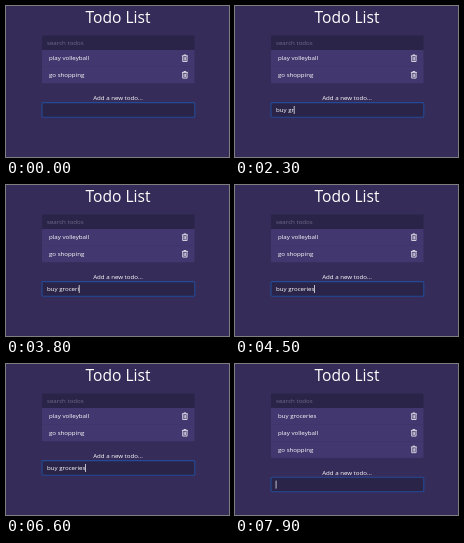
These frames come from a looping animation (223 px wide and 151 px high, 8 s). An HTML page:

```html
<!DOCTYPE html>
<html lang="en">
<head>
<meta charset="utf-8">
<title>Todo List</title>
<style>
  html, body { margin: 0; width: 100%; height: 100%; overflow: hidden; background: #352c59; }
  svg { display: block; width: 223px; height: 151px; }
  text { font: 6.15px "Open Sans", "Noto Sans", sans-serif; fill: #fff; white-space: pre; }
  .title { font-size: 15.6px; font-weight: 500; }
  .mid { text-anchor: middle; }
  .hint { fill: #706a8b; }
  .field { fill: #2a2448; }
  .row { fill: #42376e; }
  .bin { fill: none; stroke: #fff; stroke-width: .75; }
</style>
</head>
<body>
<svg viewBox="0 0 223 151">
  <defs>
    <path id="bin" class="bin" d="M0 1.3H6M2 1.2V.4H4V1.2M.8 1.5V7H5.2V1.5M2.3 2.6V6M3.7 2.6V6"/>
  </defs>
  <text class="title mid" x="112" y="16.8">Todo List</text>
  <rect class="field" x="36" y="29.5" width="152.5" height="14.5"/>
  <text class="hint" x="41" y="39.2">search todos</text>
  <g id="list"></g>
  <g id="form">
    <text class="mid" x="112" y="94.2">Add a new todo...</text>
    <rect class="field" x="36" y="96.6" width="152.8" height="14.6" rx="1.2" stroke="#244a96" stroke-width="1.1"/>
    <text id="typed" x="41" y="106.3"></text>
    <rect id="caret" y="100" width=".7" height="8" fill="#fff"/>
  </g>
</svg>
<script>
const LOOP = 8000, SUBMIT = 6700, BLINK = 530, ROW = 16.6;
const entry = "buy groceries";
const keyTimes = [700, 900, 1200, 1400, 1700, 1900, 2400, 2600, 2800, 3100, 3700, 4000, 4300];
const [list, form, typed, caret] = ["list", "form", "typed", "caret"].map(id => document.getElementById(id));

const row = (label, i) => `<g transform="translate(0 ${44 + i * ROW})">
  <rect class="row" x="36" width="152.5" height="${ROW + .1}"/>
  <text x="43" y="10.4">${label}</text>
  <use href="#bin" x="175.9" y="4.5"/></g>`;

let shown;
function showTodos(added) {
  if (shown === added) return;
  shown = added;
  const todos = ["play volleyball", "go shopping"];
  if (added) todos.unshift(entry);
  list.innerHTML = todos.map(row).join("");
  form.setAttribute("transform", `translate(0 ${added ? ROW : 0})`);
}

function draw(now) {
  const t = now % LOOP, added = t >= SUBMIT;
  const count = keyTimes.filter(k => k <= t).length;
  // The caret restarts its blink with every key press
  const lastKey = added ? SUBMIT : count ? keyTimes[count - 1] : -760;
  showTodos(added);
  typed.textContent = added ? "" : entry.slice(0, count);
  caret.setAttribute("x", 40.7 + typed.getComputedTextLength());
  caret.style.opacity = Math.floor((t - lastKey) / BLINK) % 2 ? 0 : 1;
}

function tick() {
  draw(performance.now());
  requestAnimationFrame(tick);
}
tick();
</script>
</body>
</html>
```
